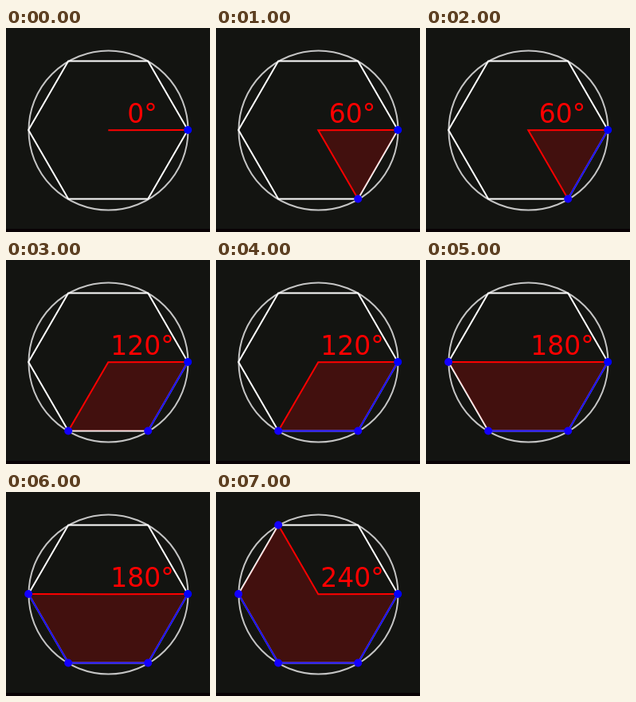
An HTML page for the animation above (8000 ms loop, 256 px wide and 256 px high).

```html
<!DOCTYPE html>
<html lang="en">
<head>
<meta charset="utf-8">
<title>Hexagon angles</title>
<style>
  html, body { margin: 0; width: 100%; height: 100%; overflow: hidden; background: #131411; }
  svg { display: block; width: 100vw; height: 100vh; }
  text { font: 33px "DejaVu Sans", sans-serif; text-anchor: middle; fill: #f00; }
</style>
</head>
<body>
<svg viewBox="0 0 256 256">
  <rect width="256" height="256" fill="#131411"/>
  <rect y="252" width="256" height="4" fill="#090205"/>
  <circle cx="128.5" cy="128.5" r="100" fill="none" stroke="#c4c4c4" stroke-width="2"/>
  <polygon id="hexagon" fill="none" stroke="#fff" stroke-width="2"/>
  <polygon id="sector" fill="#f00" fill-opacity=".2"/>
  <polyline id="sides" fill="none" stroke="#1408ff" stroke-width="2"/>
  <polyline id="radii" fill="none" stroke="#f00" stroke-width="2"/>
  <g id="dots" fill="#1400ff"></g>
  <text id="label" x="171" y="118.5"></text>
</svg>
<script>
const STEP = 1000, STEPS = 8;
const $ = id => document.getElementById(id);
const center = [128.3, 128.3];

const corners = Array.from({ length: 6 }, (_, i) => {
  const a = i * Math.PI / 3;
  return [128.2 + 100 * Math.cos(a), 128 + 86.5 / Math.sin(Math.PI / 3) * Math.sin(a)];
});
const setPoints = (id, pts) => $(id).setAttribute("points", pts.join(" "));

setPoints("hexagon", corners);
const dots = corners.map(([x, y]) => {
  const dot = document.createElementNS("http://www.w3.org/2000/svg", "circle");
  dot.setAttribute("cx", x);
  dot.setAttribute("cy", y);
  dot.setAttribute("r", 5);
  $("dots").append(dot);
  return dot;
});
dots[0].setAttribute("fill", "#00f");

// Odd steps open the next sector, even steps colour its side.
function draw(step) {
  const opened = Math.ceil(step / 2);
  const traced = Math.floor(step / 2);
  setPoints("sector", opened ? [center, ...corners.slice(0, opened + 1)] : []);
  setPoints("sides", corners.slice(0, traced + 1));
  setPoints("radii", [corners[0], center, ...(opened ? [corners[opened]] : [])]);
  dots.forEach((dot, i) => dot.style.display = i <= opened ? "" : "none");
  $("label").textContent = opened * 60 + "°";
}

let shown = -1;
const start = performance.now();
function tick() {
  const step = Math.floor((performance.now() - start) / STEP) % STEPS;
  if (step !== shown) draw(shown = step);
  requestAnimationFrame(tick);
}
tick();
</script>
</body>
</html>
```
